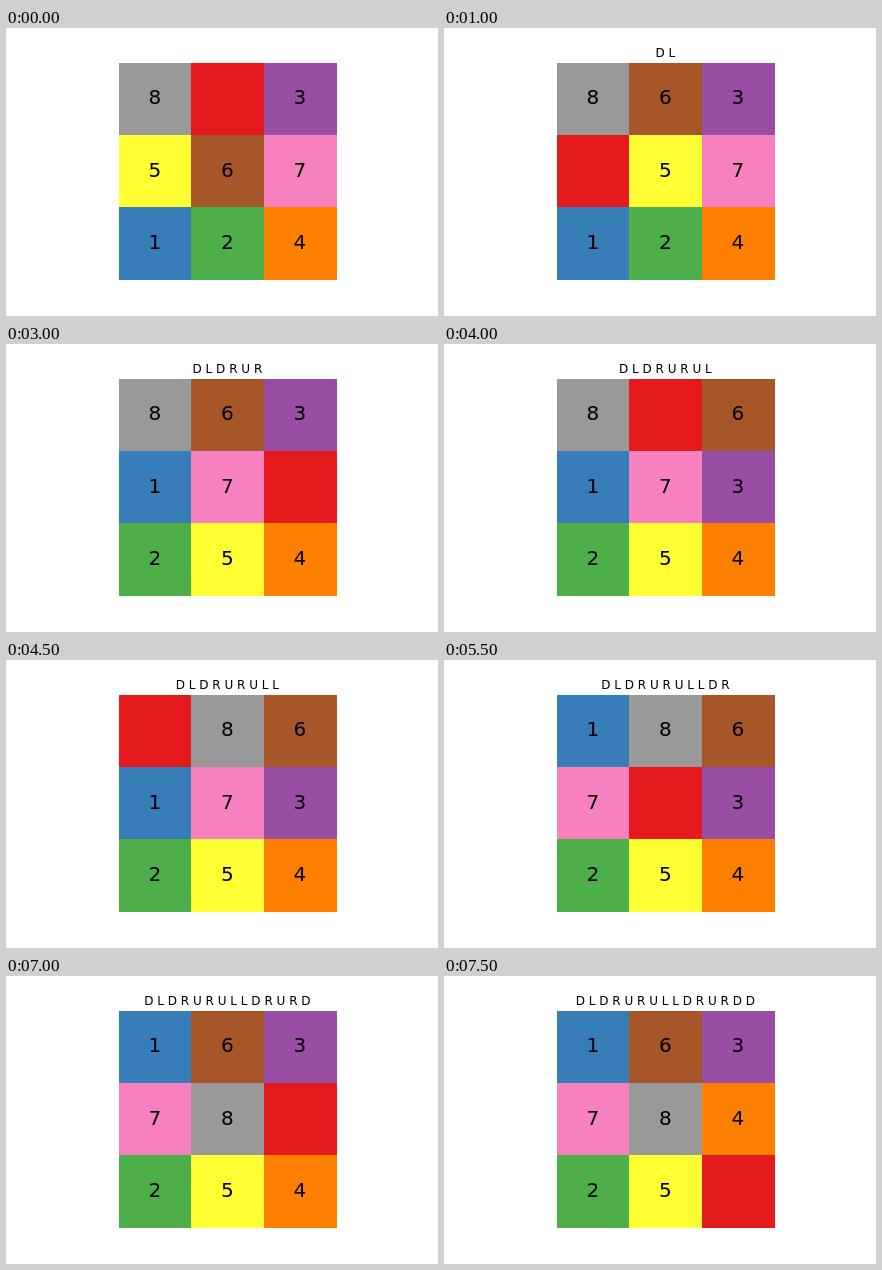
Animation, 432 px wide and 288 px high, one loop 8 s. Source, as an HTML page:

```html
<!DOCTYPE html>
<html lang="en">
<head>
<meta charset="utf-8">
<title>Sliding puzzle</title>
<style>
  html, body { margin: 0; width: 100%; height: 100%; overflow: hidden; background: #fff; }
  svg { display: block; width: 432px; height: 288px; }
  text { font-family: "DejaVu Sans", sans-serif; text-anchor: middle; fill: #000; }
  #moves { font-size: 12px; }
  .digit { font-size: 20px; }
</style>
</head>
<body>
<svg viewBox="0 0 432 288">
  <text id="moves" x="221.4" y="29"></text>
  <g id="board"></g>
</svg>
<script>
const NS = "http://www.w3.org/2000/svg";
const STEP = 500, LOOP = 8000;
const START = [8, 0, 3, 5, 6, 7, 1, 2, 4];
const MOVES = [..."DLDRURULLDRURDD"];
const SHIFT = { U: -3, D: 3, L: -1, R: 1 };
const COLORS = ["#e41a1c", "#377eb8", "#4daf4a", "#984ea3", "#ff7f00",
                "#ffff33", "#a65628", "#f781bf", "#999999"];
const XS = [113, 185, 258, 331], YS = [35, 107, 179, 252];
const TEXT_X = [148.9, 221.4, 293.9], BASELINES = [76, 149, 221];

const title = document.getElementById("moves");
const board = document.getElementById("board");

function add(tag, attrs) {
  const el = document.createElementNS(NS, tag);
  for (const key in attrs) el.setAttribute(key, attrs[key]);
  return board.appendChild(el);
}

const cells = START.map((_, i) => {
  const col = i % 3, row = Math.floor(i / 3);
  return {
    rect: add("rect", {
      x: XS[col], y: YS[row],
      width: XS[col + 1] - XS[col], height: YS[row + 1] - YS[row],
      "shape-rendering": "crispEdges"
    }),
    label: add("text", { class: "digit", x: TEXT_X[col], y: BASELINES[row] })
  };
});

// Slide the blank through the first `count` moves.
function stateAfter(count) {
  const tiles = [...START];
  for (const move of MOVES.slice(0, count)) {
    const blank = tiles.indexOf(0), next = blank + SHIFT[move];
    tiles[blank] = tiles[next];
    tiles[next] = 0;
  }
  return tiles;
}

let shown = -1;
function draw(count) {
  if (count === shown) return;
  shown = count;
  title.textContent = MOVES.slice(0, count).join(" ");
  stateAfter(count).forEach((tile, i) => {
    cells[i].rect.setAttribute("fill", COLORS[tile]);
    cells[i].label.textContent = tile || "";
  });
}

const begin = performance.now();
function tick() {
  draw(Math.floor(((performance.now() - begin) % LOOP) / STEP));
  requestAnimationFrame(tick);
}
tick();
</script>
</body>
</html>
```
